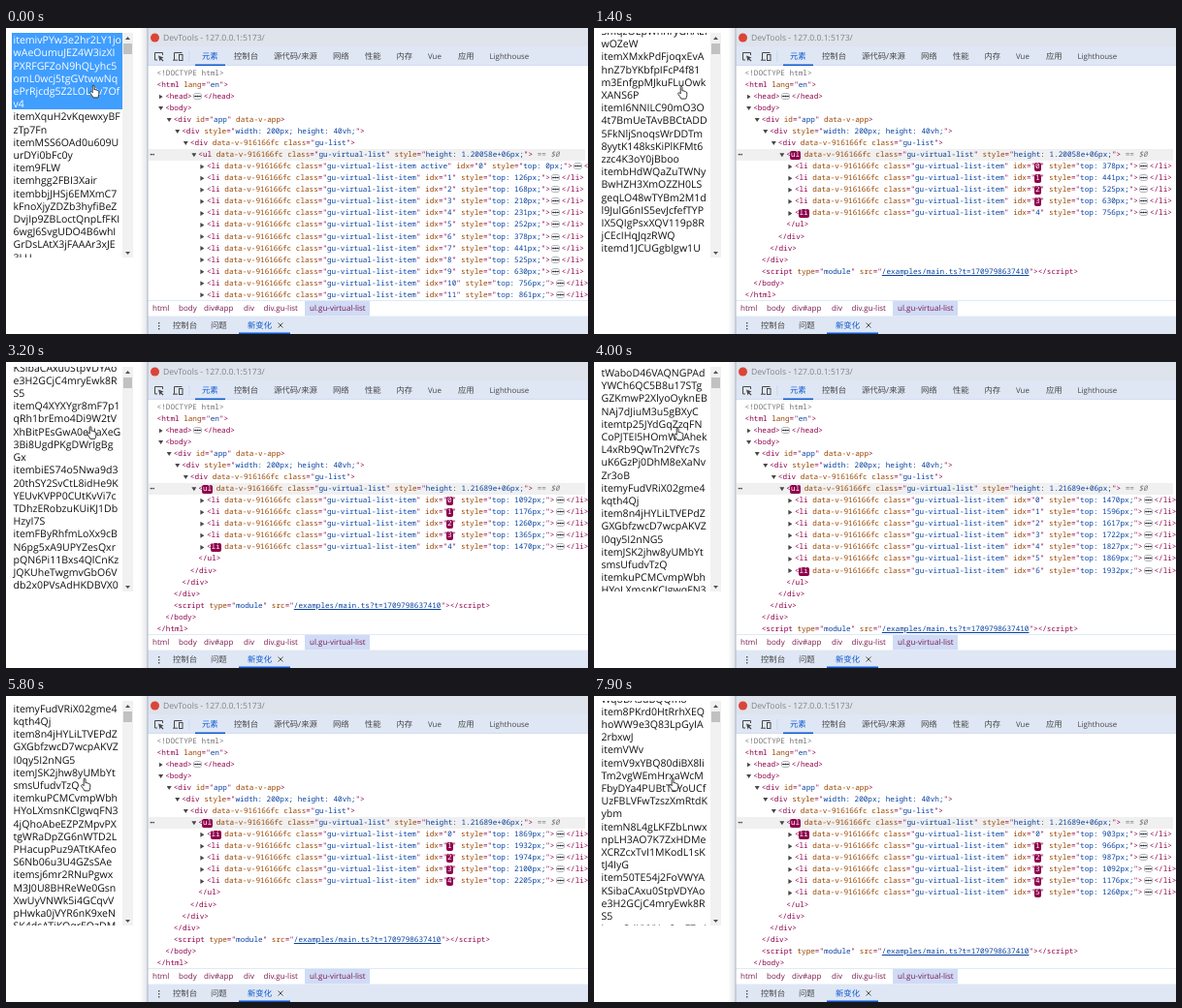
An HTML page with a canvas that plays this animation: 600x316 px, repeating every 8 s.

```html
<!DOCTYPE html>
<html lang="zh-CN">
<head>
<meta charset="utf-8">
<title>Virtual list</title>
<style>
html, body { margin: 0; width: 100%; height: 100%; overflow: hidden; background: #fff; }
#stage { position: relative; width: 600px; height: 316px; overflow: hidden; text-rendering: geometricPrecision; }
#stage canvas { position: absolute; left: 0; top: 0; width: 600px; height: 316px; }
#list { position: absolute; left: 6px; top: 4.5px; width: 114px; height: 232.5px; overflow: hidden; }
#items { position: absolute; left: 0; top: 0; width: 114px;
  font: 10.55px/13.2px "Open Sans", "Noto Sans", sans-serif; color: #111; }
#items div { white-space: pre; padding-left: 1.5px; }
#items span { position: relative; top: 2.6px; }
#items .active { background: #409eff; color: #fff; }
.label { position: absolute; white-space: pre; line-height: 12px;
  font-family: "Open Sans", "Noto Sans CJK SC", "Noto Sans CJK", sans-serif; }
#tree { position: absolute; left: 147px; top: 39px; width: 453px; height: 241px; overflow: hidden;
  font: 7.667px/12px "Noto Sans Mono", "DejaVu Sans Mono", monospace; color: #8e004b; }
.row { position: absolute; white-space: pre; height: 12px; }
.sel { position: absolute; left: 0; width: 450px; height: 12px; background: #f0f0f0; }
.a { color: #994500; }
.v { color: #0842a0; }
.u { text-decoration: underline; }
.g { color: #757575; }
.dots { color: #333; font-weight: bold; }
.hot { display: inline-block; line-height: 9px; border-radius: 2px; padding: 0 1px; margin: 0 -1px; }
.more { display: inline-block; width: 9px; height: 7px; margin: 0 1.5px; border-radius: 3px; vertical-align: -1px;
  background: radial-gradient(circle, #222 0.7px, transparent 1.1px) 1px 0 / 2.4px 7px repeat-x, #f4f6fa;
  background-clip: content-box, border-box; padding: 0 1px; box-sizing: border-box;
  box-shadow: inset 0 0 0 0.7px #a0a4aa; }
.arrow { position: absolute; left: -6.5px; top: 3.5px; width: 4px; height: 5px; background: #474747;
  clip-path: polygon(0 0, 100% 50%, 0 100%); }
.open { left: -7px; top: 4px; width: 5px; height: 4px; clip-path: polygon(0 0, 100% 0, 50% 100%); }
#hand { position: absolute; left: 0; top: 0; width: 11px; height: 15px; overflow: visible; }
</style>
</head>
<body>
<div id="stage">
  <canvas id="shapes"></canvas>
  <div id="list"><div id="items"></div></div>
  <div id="tree"></div>
  <svg id="hand" viewBox="0 0 11 15"><path fill="#fff" stroke="#222" stroke-width=".9" stroke-linejoin="round"
    d="M3.2 1.6C3.2.3 5 .3 5 1.6V5.2q1.5-.6 1.9.4 1.3-.4 1.6.6 1.3-.1 1.3 1V9.8Q9.7 11.6 8.7 13.4H4Q2.5 10.9 1 8.9.2 7.5 1.3 7.1 2.4 6.8 3.2 8.2Z"/></svg>
</div>
<script>
const LOOP = 8000, STEP = 100, LINE = 21, SCALE = 13.2 / LINE, VIEW = 373, PITCH = 12.05;
const $ = id => document.getElementById(id);

// Items are separated by spaces, wrapped lines by slashes.
const items = `
itemivPYw3e2hr2LY1jo/wAeOumuJEZ4W3izXI/PXRFGFZoN9hQLyhc5/omL0wcj5tgGVtwwNq/ePrRjcdg5Z2LOLRv7Of/v4
itemXquH2vKqewxyBF/zTp7Fn
itemMSS6OAd0u609U/urDYi0bFc0y
item9FLW
itemhgg2FBI3Xair
itembbjJHSj6EMXmC7/kFnoXjyZDZb3hyfiBeZ/DvjIp9ZBLoctQnpLfFKI/6wgJ6SvgUDO4B6whI/GrDsLAtX3jFAAAr3xJE/3LU
itemTq4vPzK8dRw2Gs/SmqzOEpWnhryGhAEr/wOZeW
itemXMxkPdFjoqxEvA/hnZ7bYKbfpIFcP4f81/m3EnfgpMJkuFLuOwk/XANS6P
itemI6NNILC90mO3O/4t7BmUeTAvBBCtADD/5FkNljSnoqsWrDDTm/8yytK148ksKiPlKFMt6/zzc4K3oY0jBboo
itembHdWQaZuTWNy/BwHZH3XmOZZH0LS/geqLO48wTYBm2M1d/l9JulG6nIS5evJcfefTYP/IX5QIgPsxXQV119p8R/jCEcIHqJqzRWQ
itemd1JCUGgbIgw1U/r7KpVx3LhZ0tYbNq/Gd5mWsE8uRj2cHfT/aQ9zPk4XvBn6yLoS/Jw1Df
itemR3hYt8KzMv5pLc/WqoDA5dBQQm8
item8PKrd0HtRrhXEQ/hoWW9e3Q83LpGyIA/2rbxwJ
itemVWv
itemV9xYBQ80diBX8li/Tm2vgWEmHrxaWcM/FbyDYa4PUBtTSYoUCf/UzFBLVFwTzszXmRtdK/ybm
itemN8L4gLKFZbLnwx/npLH3AO7K7ZxHDMe/XCRZcxTvI1MKodL1sK/tJ4IyG
item50TE54j2FoVWYA/KSibaCAxu0StpVDYAo/e3H2GCjC4mryEwk8R/S5
itemQ4XYXYgr8mF7p1/qRh1brEmo4Di9W2tV/XhBitPEsGwA0eUaXeG/3Bi8UgdPKgDWrIgBg/Gx
itembiES74o5Nwa9d3/20thSY2SvCtL8idHe9K/YEUvKVPP0CUtKvVi7c/TDhzERobzuKUiKJ1Db/HzyI7S
itemFByRhfmLoXx9cB/N6pg5xA9UPYZesQxr/pQN6Pi11Bxs4QlCnKz/JQKUheTwgmvGbO6V/db2x0PVsAdHKDBVX0/7u6A2bUns
itemf
itemfZTcUEoRP6wYriP/tWaboD46VAQNGPAd/YWCh6QC5B8u17STg/GZKmwP2XlyoOyknEB/NAj7dJiuM3u5gBXyC
itemtp25JYdGqZzqFN/CoPJTEI5HOmW3Ahek/L4xRb9QwTn2VfYc7s/uK6GzPj0DhM8eXaNv/Zr3oB
itemyFudVRiX02gme4/kqth4Qj
item8n4jHYLiLTVEPdZ/GXGbfzwcD7wcpAKVZ/I0qy5I2nNG5
itemJSK2jhw8yUMbYt/smsUfudvTzQ
itemkuPCMCvmpWbh/HYoLXmsnKCIgwqFN3/4jQhoAbeEZPZMpvPX/tgWRaDpZG6nWTD2L/PHacupPuz9ATtKAfeo/S6Nb06u3U4GZsSAe
itemsj6mr2RNuPgwx/M3J0U8BHReWe0Gsn/XwUyVNWk5i4GCqvV/pHwka0jVYR6nK9xeN/SK4dsATjKQqrEQzDM
itemchm7Pd1WSEdRv/FMRnb7I5cPKazx53fC/Pnz5dW5H1ezmQbR4/dqU2NhH5vQ29xd7yf/HmHrXOvjGe
itemC2KjFvjwSoK80XX/E0mNjXjdISkG7Wu3lK/I5vOAGVmoxU5pgdY/XY2DPXv8RW0sROp
itemW9qIL5J
itemfm8i0mPlRCM8Xr/Vb6TzK1sYq4HwDn/c9LgQx
itemUe7RpN2kWz5JfB/hM3vXoS8tGy0LaC/Pd6rKi
itemZs4YbH1qTm9Vw`.trim().split(/\s+/).map(text => ({ lines: text.split('/') }));

let height = 0;
for (const item of items) {
  item.top = height;
  height += item.lines.length * LINE;
  item.end = height;
}

const SCROLL = [[0, 0], [100, 12], [500, 108], [1200, 350], [1300, 385], [1400, 414], [2900, 1065], [3000, 1110],
  [3200, 1208], [4600, 1964], [4800, 2071], [5050, 2172], [5200, 2165], [5600, 1935], [5700, 1880], [5800, 1827],
  [6700, 1490], [6800, 1445], [6900, 1400], [7700, 975], [7800, 942], [7900, 897]];
const HAND = [[0, 86, 58.5], [1400, 86, 59.7], [3200, 83, 66], [4800, 81, 68.5], [5800, 77, 84.5], [7900, 77, 84.5]];

function at(keys, t, k = 1) {
  const i = keys.findIndex(key => key[0] > t);
  if (i < 0) return keys[keys.length - 1][k];
  const a = keys[i - 1], b = keys[i];
  return a[k] + (b[k] - a[k]) * (t - a[0]) / (b[0] - a[0]);
}

// The inspector trails the list by one step and flashes what its last update touched.
const states = [{ first: 0, last: 18, step: -99 }];
for (let n = 1; n < LOOP / STEP; n++) {
  const prev = states[n - 1], s = at(SCROLL, (n - 1) * STEP);
  const first = n < 2 ? 0 : items.findIndex(i => i.end > s);
  const last = n < 2 ? 18 : items.filter(i => i.top <= s + VIEW).length - 1;
  states.push(first === prev.first && last === prev.last ? prev : { first, last, prev, step: n });
}

const span = (cls, text) => `<span class="${cls}">${text}</span>`;
const attr = (name, value, cls = 'v') => ' ' + span('a', name) + (value === undefined ? '' : `="${span(cls, value)}"`);
const open = (name, ...attrs) => `&lt;${name}${attrs.join('')}&gt;`;
const close = name => `&lt;/${name}&gt;`;
const MORE = '<span class="more"></span>';
const SCOPE = attr('data-v-916166fc');

function hot(text, alpha) {
  if (alpha <= 0) return text;
  const ink = alpha > 0.5 ? 'color:#fff;' : '';
  return `<span class="hot" style="${ink}background:rgba(142,0,75,${alpha})">${text}</span>`;
}

function drawTree(n) {
  const { first, last, prev, step } = states[n];
  const glow = Math.max(0, Math.min(1, 1 - (n - step - 3) / 10));
  const total = n < 18 ? '1.20058e+06px' : '1.21689e+06px';
  let html = '', y = 1.8;
  const row = (level, content, arrow) => {
    const tip = arrow ? `<span class="arrow ${arrow}"></span>` : '';
    html += `<div class="row" style="left:${8.6 + 8.55 * level}px;top:${y}px">${tip}${content}</div>`;
    y += PITCH;
  };
  row(0, span('g', '&lt;!DOCTYPE html&gt;'));
  row(0, open('html', attr('lang', 'en')));
  row(1, open('head') + MORE + close('head'), 'shut');
  row(1, open('body'), 'open');
  row(2, open('div', attr('id', 'app'), attr('data-v-app')), 'open');
  row(3, open('div', attr('style', 'width: 200px; height: 40vh;')), 'open');
  row(4, open('div', SCOPE, attr('class', 'gu-list')), 'open');
  html += `<div class="sel" style="top:${y}px"></div><div class="row dots" style="left:1.5px;top:${y}px">⋯</div>`;
  row(5, open(hot('ul', glow), SCOPE, attr('class', 'gu-virtual-list'), attr('style', `height: ${total};`)) +
    span('g', ' == <i>$0</i>'), 'open');
  for (let i = first; i <= last; i++) {
    const isNew = prev && (i < prev.first || i > prev.last);
    const moved = prev && !isNew && prev.first !== first;
    row(6, open(hot('li', isNew ? glow : 0), SCOPE,
      attr('class', 'gu-virtual-list-item' + (i ? '' : ' active')),
      attr('idx', hot(i - first, moved ? glow : 0)),
      attr('style', `top: ${items[i].top}px;`)) + MORE + close('li'), 'shut');
  }
  row(5, close('ul'));
  for (const level of [4, 3, 2]) row(level, close('div'));
  row(2, open('script', attr('type', 'module'), attr('src', '/examples/main.ts?t=1709798637410', 'v u')) + close('script'));
  row(1, close('body'));
  row(0, close('html'));
  $('tree').innerHTML = html;
}

function label(x, y, text, size = 8.4, color = '#474747') {
  const el = document.createElement('div');
  el.className = 'label';
  el.textContent = text;
  el.style.cssText = `left:${x}px;top:${y - 6}px;font-size:${size}px;color:${color}`;
  $('stage').append(el);
}

function drawShapes() {
  const canvas = $('shapes'), ctx = canvas.getContext('2d'), dpr = window.devicePixelRatio || 1;
  canvas.width = 600 * dpr;
  canvas.height = 316 * dpr;
  ctx.scale(dpr, dpr);
  const box = (x, y, w, h, color) => { ctx.fillStyle = color; ctx.fillRect(x, y, w, h); };
  const line = (color, width, ...pts) => {
    ctx.strokeStyle = color;
    ctx.lineWidth = width;
    ctx.beginPath();
    pts.forEach(([x, y]) => ctx.lineTo(x, y));
    ctx.stroke();
  };
  const shape = (color, ...pts) => {
    ctx.fillStyle = color;
    ctx.beginPath();
    pts.forEach(([x, y]) => ctx.lineTo(x, y));
    ctx.fill();
  };

  // list scrollbar
  box(120, 5, 11, 232, '#f1f1f1');
  box(121, 16, 9, 11, '#c1c1c1');
  shape('#505050', [123, 12], [125.5, 9], [128, 12]);
  shape('#505050', [123, 231], [125.5, 234], [128, 231]);

  // inspector window
  const shade = ctx.createLinearGradient(138, 0, 146, 0);
  shade.addColorStop(0, '#fff');
  shade.addColorStop(1, '#e2e4e8');
  box(138, 0, 8, 316, shade);
  box(146, 0, 454, 316, '#fff');
  box(146, 0, 454, 19, '#dee3ec');
  box(146, 19, 454, 20, '#dfe7f5');
  box(146, 38.3, 454, 0.7, '#cfdaf0');
  box(195, 37.5, 31, 1.5, '#0b57d0');
  box(146, 281, 454, 0.7, '#d3e0f5');
  box(308, 282, 67, 15.5, '#d0dbf5');
  box(146, 297.5, 454, 19, '#dfe7f5');
  box(240, 314.5, 53, 1.5, '#0b57d0');
  box(145.5, 0, 1, 316, '#a9b4c6');

  ctx.fillStyle = '#db4437';
  ctx.beginPath();
  ctx.arc(153.5, 10, 4.5, 0, 7);
  ctx.fill();

  // toolbar icons
  const ink = '#474747';
  line(ink, 1, [156, 33], [153.5, 33], [153.5, 25.5], [161.5, 25.5], [161.5, 28]);
  shape(ink, [157, 28.5], [162.5, 30.5], [160.3, 31.6], [162.5, 33.8], [161.6, 34.6], [159.5, 32.4], [158.6, 34.4]);
  line(ink, 1, [181.5, 25.5], [173.5, 25.5], [173.5, 33]);
  line(ink, 1, [172, 33.2], [177, 33.2]);
  ctx.strokeRect(178.5, 27.5, 3.5, 6);
  box(188.5, 24, 0.7, 11, '#c4d3ec');
  for (const y of [304, 307, 310]) box(157, y, 1.4, 1.4, ink);
  line(ink, 0.9, [280.5, 304.5], [285.5, 309.5]);
  line(ink, 0.9, [285.5, 304.5], [280.5, 309.5]);
}

function drawLabels() {
  label(162, 9.5, 'DevTools - 127.0.0.1:5173/', 8.6, '#7d838b');
  [[235, '控制台'], [276, '源代码/来源'], [337, '网络'], [370, '性能'], [402.5, '内存'], [466, '应用']]
    .forEach(([x, text]) => label(x, 29.5, text));
  label(202, 29.5, '元素', 8.4, '#0b57d0');
  label(435, 29.5, 'Vue', 7.9);
  label(498.5, 29.5, 'Lighthouse', 7.9);
  [[151, 'html'], [178, 'body'], [204, 'div#app'], [245, 'div'], [265.5, 'div.gu-list'], [313, 'ul.gu-virtual-list']]
    .forEach(([x, text]) => label(x, 290, text, 8, '#7a1a4f'));
  label(172, 307.8, '控制台');
  label(211, 307.8, '问题');
  label(249, 307.8, '新变化', 8.4, '#0b57d0');
}

let shown = -1;
function frame() {
  const n = Math.floor(performance.now() % LOOP / STEP);
  if (n !== shown) {
    shown = n;
    const t = n * STEP;
    $('items').style.transform = `translateY(${-at(SCROLL, t) * SCALE}px)`;
    $('hand').style.transform = `translate(${at(HAND, t)}px, ${at(HAND, t, 2)}px)`;
    drawTree(n);
  }
  requestAnimationFrame(frame);
}

$('items').innerHTML = items.map((item, i) =>
  `<div class="${i ? '' : 'active'}"><span>${item.lines.join('\n')}</span></div>`).join('');
drawShapes();
drawLabels();
frame();
</script>
</body>
</html>
```
